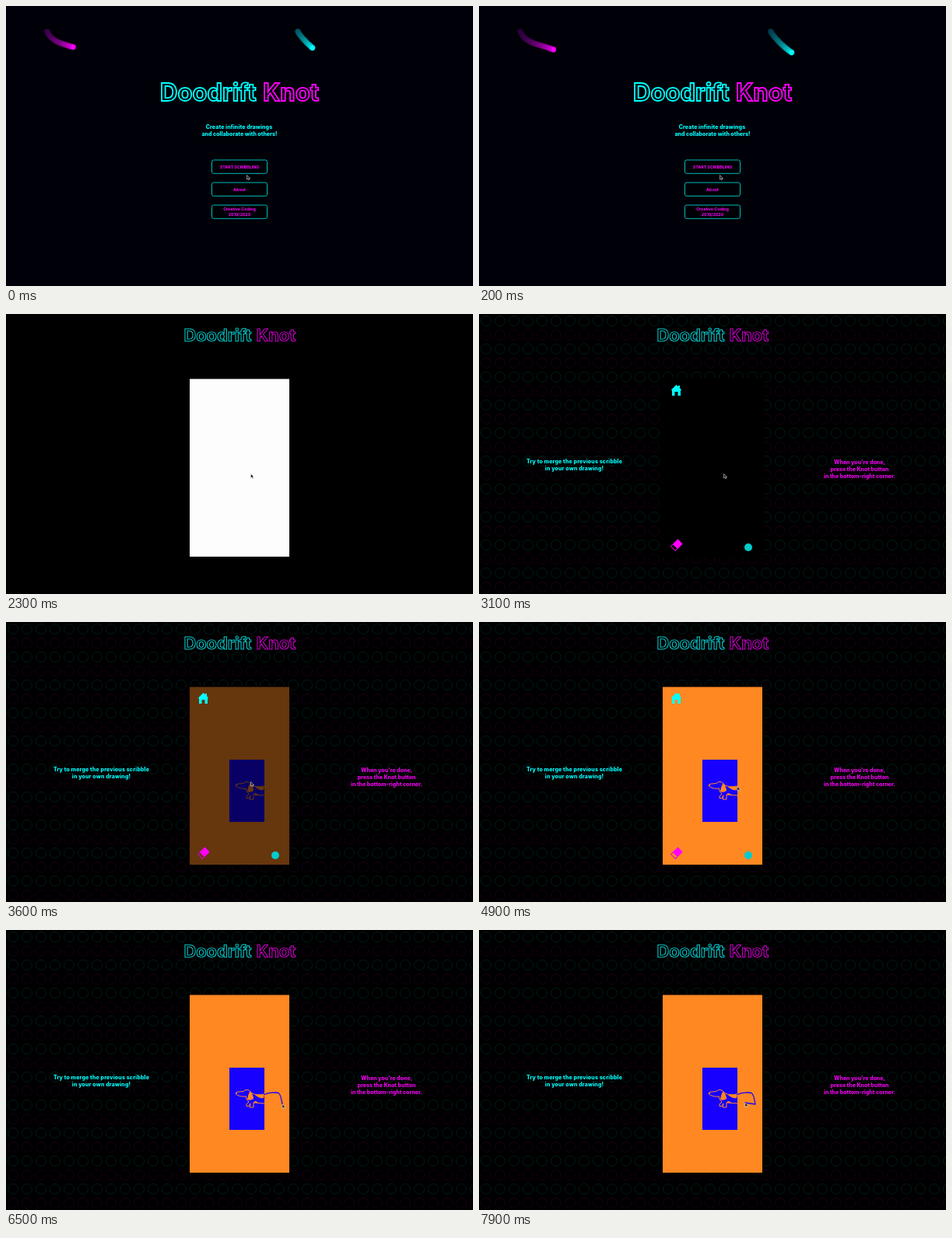
An HTML page that plays this animation: 600x360 px, repeating every 8 s.

```html
<!DOCTYPE html>
<html lang="en">
<head>
<meta charset="utf-8">
<title>Drawing game</title>
<style>
  html, body { margin: 0; width: 100%; height: 100%; overflow: hidden; background: #000; }
  svg { display: block; width: 600px; height: 360px; }
  text { font: 800 7px Inter, "Open Sans", sans-serif; text-anchor: middle; }
  .cyan { fill: #0ff; }
  .pink { fill: #f0f; }
  .title text { font-size: 31px; font-weight: 700; fill: none; stroke-width: 1.8; text-anchor: start; }
  .title .cyan { stroke: #0ff; }
  .title .pink { stroke: #f0f; text-anchor: end; }
  .small text { stroke-width: 1.5; }
  .small .cyan { stroke: #0cc; }
  .small .pink { stroke: #c0c; }
  .buttons text { font-size: 5.3px; font-weight: 700; }
  .buttons rect { fill: #000006; stroke: #0bb; stroke-width: 1; }
  .line { fill: none; stroke-width: 1; stroke-linecap: round; stroke-linejoin: round; }

  .home, .page, .hover, .blank, .intro, .art, .tools { animation: 8s step-end infinite; }
  .home { animation-name: home; }
  .page { animation-name: page; }
  .buttons .hover { animation-name: hover; }
  .blank { animation-name: blank; }
  .intro { animation-name: intro; }
  .art { animation-name: art; }
  .tools { animation-name: tools; }
  @keyframes home { 0% { opacity: 1 } 25%, 100% { opacity: 0 } }
  @keyframes page { 0% { opacity: 0 } 25%, 100% { opacity: 1 } }
  @keyframes hover { 0% { fill: #000006 } 22.5%, 100% { fill: #3c3c40 } }
  @keyframes blank {
    0% { opacity: 0 }
    25% { opacity: 0; animation-timing-function: steps(3) }
    28.75% { opacity: 1 }
    38.75%, 100% { opacity: 0 }
  }
  @keyframes intro { 0% { opacity: 0 } 38.75%, 100% { opacity: 1 } }
  @keyframes art {
    0% { opacity: 0 }
    43.75% { opacity: 0; animation-timing-function: steps(5, start) }
    48.75%, 100% { opacity: 1 }
  }
  @keyframes tools { 0% { opacity: 0 } 38.75% { opacity: 1 } 62.5%, 100% { opacity: 0 } }
</style>
</head>
<body>
<svg viewBox="0 0 600 360">
  <defs>
    <pattern id="rings" width="18" height="36" patternUnits="userSpaceOnUse">
      <g fill="none" stroke-width=".8">
        <circle cx="9" cy="9" r="6.500" stroke="#002020"/>
        <circle cx="9" cy="27" r="6.500" stroke="#1c001c"/>
      </g>
    </pattern>
  </defs>

  <g class="home">
    <rect width="600" height="360" fill="#000008"/>
    <g id="trails"></g>
    <g class="title">
      <text class="cyan" x="198" y="122">Doodrift</text>
      <text class="pink" x="402" y="122">Knot</text>
    </g>
    <g class="cyan">
      <text x="299.500" y="158" letter-spacing=".1">Create infinite drawings</text>
      <text x="300" y="167">and collaborate with others!</text>
    </g>
    <g class="buttons">
      <rect class="hover" x="264.5" y="198" width="71" height="17.3" rx="2.2"/>
      <rect x="264.5" y="227" width="71" height="17.3" rx="2.2"/>
      <rect x="264.5" y="256" width="71" height="17.3" rx="2.2"/>
      <text class="pink" x="300" y="208.5">START SCRIBBLING</text>
      <text class="pink" x="300" y="237.5">About</text>
      <text class="pink" x="300" y="263.3">Creative Coding</text>
      <text class="pink" x="300" y="270">2019/2020</text>
    </g>
  </g>

  <g class="page">
    <rect width="600" height="360"/>
    <g class="intro">
      <rect width="600" height="360" fill="url(#rings)"/>
      <rect x="234" y="82" width="132" height="231"/>
      <g class="cyan" letter-spacing=".14">
        <text x="122.5" y="191.5">Try to merge the previous scribble</text>
        <text x="122.5" y="200.5">in your own drawing!</text>
      </g>
      <g fill="#ec00ec">
        <text x="489" y="192.5">When you're done,</text>
        <text x="489" y="201.5">press the Knot button</text>
        <text x="489" y="210.5">in the bottom-right corner.</text>
      </g>
    </g>
    <g class="title small" transform="translate(88.8 -51) scale(.705)">
      <text class="cyan" x="198" y="122">Doodrift</text>
      <text class="pink" x="402" y="122">Knot</text>
    </g>
    <rect class="blank" x="236" y="83.5" width="128" height="228.5" fill="#fdfdfd"/>

    <g class="art">
      <rect x="236" y="83.5" width="128" height="228.5" fill="#ff8822"/>
      <rect x="287" y="177" width="45" height="80" fill="#1800ff"/>
      <g class="line" stroke="#ff8822">
        <path d="M308 214C304 215 297 213 295.5 211Q294 208.5 299 208L305 207.5Q309 203.5 313.5 207L316 210Q322 213 332 211"/>
        <path d="M308 214Q309 219 312 221L309 224V226.500H312L314 223L313 228H318V222L332 223"/>
      </g>
      <g fill="#ff8822">
        <path d="M313.500 207.500Q318 212 318 217Q314 220 310 218Q311 211 313.500 207.500Z"/>
        <path d="M320 212L332 211.500L331 216Q325 217 320 212ZM318 222Q320 218 324 222Z"/>
        <circle cx="296" cy="210" r="1"/>
      </g>
      <path id="pen" class="line" stroke="#1800ff" style="stroke-width:1.3"
        d="M332 211.500C338 209 346 208.500 350 209.500C353 211 354 218 355 224C351 223.500 347 223 342 222"/>
    </g>

    <g class="tools">
      <path class="cyan" d="M247 97.500L253.500 91L256 93.300V92H258V95.300L260 97.500L259 98.500V105H255.500V100H251.500V105H248V98.500Z"/>
      <g transform="translate(254 297) rotate(-45)">
        <rect class="pink" x="-3" y="-4.500" width="9.500" height="9" rx="1"/>
        <path class="line" stroke="#d0d" d="M-3-4H-6.500V4H-3"/>
      </g>
      <circle cx="346" cy="300" r="5" fill="#0cc"/>
    </g>
  </g>

  <path id="cursor" d="M0 0V5.500L1.400 4.300L2.300 6.300L3.200 5.900L2.300 3.900H4Z" fill="#111" stroke="#fff" stroke-width=".5"/>
</svg>

<script>
  const LOOP = 8000, STEP = 100;
  const FADED = [5, 4, 28];
  const $ = id => document.getElementById(id);
  const clamp = v => Math.min(1, Math.max(0, v));
  const progress = (t, from, to) => clamp((t - from) / (to - from));

  function svg(name, attrs, parent) {
    const el = document.createElementNS('http://www.w3.org/2000/svg', name);
    for (const key in attrs) el.setAttribute(key, attrs[key]);
    return parent ? parent.appendChild(el) : el;
  }

  // A row of dots along a path: a bright head, then a fading tail.
  function makeTrail({ d, color, start, rest, tail, reach }) {
    const path = svg('path', { d });
    const total = path.getTotalLength();
    const dots = [];
    for (let at = 0; at <= total; at += 2) {
      const p = path.getPointAtLength(at);
      const el = svg('circle', {
        cx: p.x, cy: p.y, r: 3.7, stroke: 'rgba(0,0,8,.4)', 'stroke-width': .6
      }, $('trails'));
      dots.push({ at, el });
    }
    return t => {
      const early = t < 1800;
      const head = early ? start + 5 * Math.min(t / STEP, 2) : total - (t < 1900 ? rest : 0);
      for (const { at, el } of dots) {
        const gap = head - at;
        const fade = Math.exp(-gap / (early ? 28 : reach));
        const glow = early || gap < 2 ? fade : tail * fade;
        const mix = color.map((c, i) => Math.round(FADED[i] + (c - FADED[i]) * glow));
        el.setAttribute('fill', `rgb(${mix})`);
        el.setAttribute('visibility', gap >= 0 ? 'inherit' : 'hidden');
      }
    };
  }

  const trails = [
    makeTrail({
      d: 'M53 33C60 48 76 49 90 54C125 66 180 100 198 126C212 148 226 168 228 178C229 187 224 190 221 197L219 203',
      color: [255, 0, 255], start: 41, rest: 6, tail: .9, reach: 38
    }),
    makeTrail({
      d: 'M375 33C380 42 393 54 402 60C430 80 475 87 526 107L528 108',
      color: [0, 255, 255], start: 28, rest: 2, tail: .6, reach: 38
    })
  ];

  const pen = $('pen');
  const penLength = pen.getTotalLength();
  const corner = penLength - 13.2;

  function cursorAt(t, drawn) {
    if (t < 1800) return [309.5, 217.5];
    if (t < 5000) {
      const k = progress(t, 4100, 4900);
      return [314.5 + 17.5 * k, 205.5 + 6 * k];
    }
    const p = pen.getPointAtLength(drawn);
    return [p.x, p.y];
  }

  function draw(t) {
    if (t < 2000) trails.forEach(trail => trail(t));
    const drawn = corner * progress(t, 4900, 6500) + (penLength - corner) * progress(t, 6500, 7900);
    pen.style.strokeDasharray = `${drawn} 999`;
    pen.style.visibility = drawn ? 'visible' : 'hidden';
    $('cursor').setAttribute('transform', `translate(${cursorAt(t, drawn)})`);
  }

  let origin;
  function tick(now) {
    origin ??= now;
    const t = (now - origin) % LOOP;
    draw(Math.floor(t / STEP) * STEP);
    requestAnimationFrame(tick);
  }
  draw(0);
  requestAnimationFrame(tick);
</script>
</body>
</html>
```
